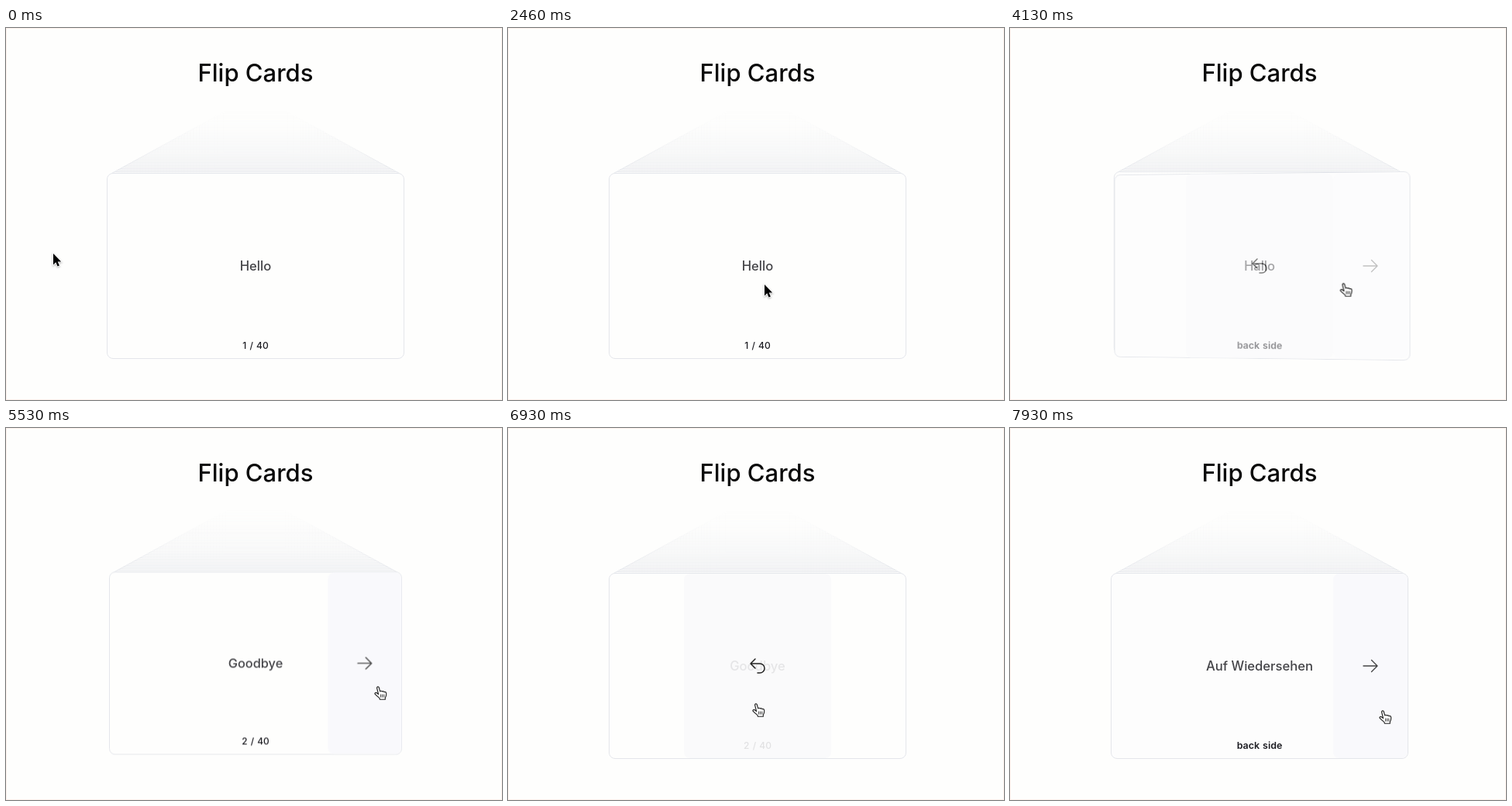
These frames come from a looping animation (640x480 px, 8000 ms). An HTML page:

```html
<!DOCTYPE html>
<html lang="en">
<head>
<meta charset="utf-8">
<title>Flip Cards</title>
<style>
@property --shift { syntax: "<number>"; inherits: true; initial-value: 0; }

html, body { margin: 0; width: 100%; height: 100%; overflow: hidden; }
body { background: #fefefd; font-family: Inter, "Open Sans", sans-serif; }
* { box-sizing: border-box; }

.stage {
  position: relative; width: 640px; height: 480px; overflow: hidden;
  border: 1px solid #fdf1ec;
}
.stage > * { margin: -1px 0 0 -1px; }

h1 {
  position: absolute; left: 0; top: 36.5px; width: 644px; padding: 0;
  font-size: 31px; font-weight: 550; line-height: 41px;
  text-align: center; color: #0a0a0a;
}

/* Stack: every card sits --depth steps behind the front one */
.deck {
  position: absolute; left: 130px; top: 187px; width: 384px; height: 240px;
  animation: advance 8s infinite;
}
.card {
  --depth: calc(var(--i) + var(--shift));
  position: absolute; inset: 0;
  transform: translateY(calc(var(--depth) * -4.43px)) scale(calc(1 - var(--depth) * .02));
}
.behind { opacity: calc(1 - var(--depth) * .023); }
.behind, .face {
  background: #fefefd; border: 1px solid #e4e6eb; border-radius: 8px;
}
.front { --i: 0; }

.scene, .flip, .face { position: absolute; inset: 0; }
.scene { perspective: 1080px; }
.flip { transform-style: preserve-3d; }
.first { animation: flip-first 8s infinite, show-first 8s step-end infinite; }
.second { animation: flip-second 8s infinite, show-second 8s step-end infinite; }
.face {
  display: flex; align-items: center; justify-content: center;
  font-size: 16.6px; font-weight: 450; color: #444448; backface-visibility: hidden;
}
.back { transform: rotateY(180deg); background: #fdfdfd; }
.face small {
  position: absolute; left: 0; right: 0; top: 211px;
  font-size: 12px; font-weight: 550; line-height: 22px; word-spacing: 1px;
  text-align: center; color: #1c1c22;
}
.back small { font-size: 12.4px; font-weight: 600; }

.zone {
  position: absolute; top: 1px; bottom: 1px; border-radius: 8px;
  display: flex; align-items: center; justify-content: center;
}
.zone svg { width: 24px; height: 24px; }
.zone path {
  fill: none; stroke: #222; stroke-width: 1.5;
  stroke-linecap: round; stroke-linejoin: round;
}
.turn {
  left: 97px; width: 190px; background: rgba(250, 250, 251, .89);
  animation: hover-turn 8s infinite;
}
.next {
  left: 287px; right: 1px; background: rgba(249, 249, 252, .89);
  animation: hover-next 8s infinite;
}
.next path { stroke: #444; stroke-width: 1.4; }

.cursor {
  position: absolute; left: 0; top: 0;
  animation: move 8s linear infinite;
}
.cursor svg { position: absolute; left: 0; top: 0; overflow: visible; }
.arrow {
  filter: drop-shadow(0 1px 1px rgba(0, 0, 0, .3));
  animation: show-arrow 8s step-end infinite;
}
.hand { margin-left: -5.5px; animation: show-hand 8s step-end infinite; }

@keyframes advance {
  0%, 68.34% { --shift: 0; }
  68.35% { --shift: 1; animation-timing-function: ease; }
  73.1%, 100% { --shift: 0; }
}
@keyframes flip-first {
  0%, 46.1% { transform: rotateY(0deg); animation-timing-function: ease; }
  53.3%, 100% { transform: rotateY(180deg); }
}
@keyframes flip-second {
  0%, 92% { transform: rotateY(0deg); animation-timing-function: ease; }
  99.1%, 100% { transform: rotateY(180deg); }
}
@keyframes show-first { 0% { visibility: visible; } 68.35%, 100% { visibility: hidden; } }
@keyframes show-second { 0% { visibility: hidden; } 68.35%, 100% { visibility: visible; } }
@keyframes show-arrow { 0% { visibility: visible; } 33.25%, 100% { visibility: hidden; } }
@keyframes show-hand { 0% { visibility: hidden; } 33.25%, 100% { visibility: visible; } }
@keyframes hover-turn {
  0%, 33% { opacity: 0; }
  36.5%, 51% { opacity: 1; }
  53.5%, 79% { opacity: 0; }
  82.3%, 95.6% { opacity: 1; }
  98.3%, 100% { opacity: 0; }
}
@keyframes hover-next {
  0%, 51% { opacity: 0; }
  54%, 79% { opacity: 1; }
  82.3%, 95.6% { opacity: 0; }
  98.5%, 100% { opacity: 1; }
}
@keyframes move {
  0%, 5% { transform: translate(61px, 291px); }
  6.8% { transform: translate(51px, 303px); }
  8.2% { transform: translate(70px, 334px); }
  10% { transform: translate(150px, 390px); }
  12% { transform: translate(265px, 442px); }
  14.1%, 15.5% { transform: translate(339px, 465px); }
  17.5%, 20.6% { transform: translate(335px, 461px); }
  20.75%, 22% { transform: translate(334px, 448px); animation-timing-function: ease-in-out; }
  30.75% { transform: translate(331px, 331px); }
  33% { transform: translate(331px, 328px); animation-timing-function: ease-out; }
  42.5%, 48% { transform: translate(326px, 320px); animation-timing-function: ease-in-out; }
  54%, 74.5% { transform: translate(480px, 333px); animation-timing-function: ease-in-out; }
  83.2%, 93% { transform: translate(320px, 355px); animation-timing-function: ease-in-out; }
  99%, 100% { transform: translate(481px, 364px); }
}
</style>
</head>
<body>
<div class="stage">
  <h1>Flip Cards</h1>

  <div class="deck">
    <div class="card front">
      <div class="scene">
        <div class="flip first">
          <div class="face">Hello<small>1 / 40</small></div>
          <div class="face back">Hallo<small>back side</small></div>
        </div>
        <div class="flip second">
          <div class="face">Goodbye<small>2 / 40</small></div>
          <div class="face back">Auf Wiedersehen<small>back side</small></div>
        </div>
      </div>
      <div class="zone turn">
        <svg viewBox="0 0 24 24"><path d="M9 15 3 9l6-6M3 9h12a6 6 0 0 1 0 12h-3"/></svg>
      </div>
      <div class="zone next">
        <svg viewBox="0 0 24 24"><path d="M13.5 4.5 21 12l-7.5 7.5M21 12H3"/></svg>
      </div>
    </div>
  </div>

  <div class="cursor">
    <svg class="arrow" width="11" height="18">
      <path d="M0 0V14.4L3.3 11.3 5.5 16.5 7.9 15.5 5.7 10.4H10.2Z" fill="#000" stroke="#fff" stroke-width="1.6" paint-order="stroke"/>
    </svg>
    <svg class="hand" width="17" height="18">
      <g stroke="#222" stroke-width="1.15" stroke-linejoin="round" stroke-linecap="round">
        <path fill="#fff" d="M5.6 10.6 3.7 3C3.2.6 5.7 0 6.3 2L7.7 6.9C8.4 5.9 10.1 6.1 10.4 7.2 11 6.3 12.7 6.6 12.9 7.8 13.8 7.1 15.4 7.6 15.6 9 15.9 11.4 15.4 13.6 14.3 15.2V17.2H7.4L6.8 15.4C4.8 13.8 2.6 12 1.2 10.4 .4 8.8 2.2 7.8 3.6 9Z"/>
        <path d="M8.6 11v3.2M10.7 11v3.2M12.8 11v3.2" stroke-width=".9"/>
      </g>
    </svg>
  </div>
</div>

<script>
const deck = document.querySelector(".deck");
for (let i = 1; i < 40; i++) {
  const card = document.createElement("div");
  card.className = "card behind";
  card.style.setProperty("--i", i);
  deck.prepend(card);
}
</script>
</body>
</html>
```
